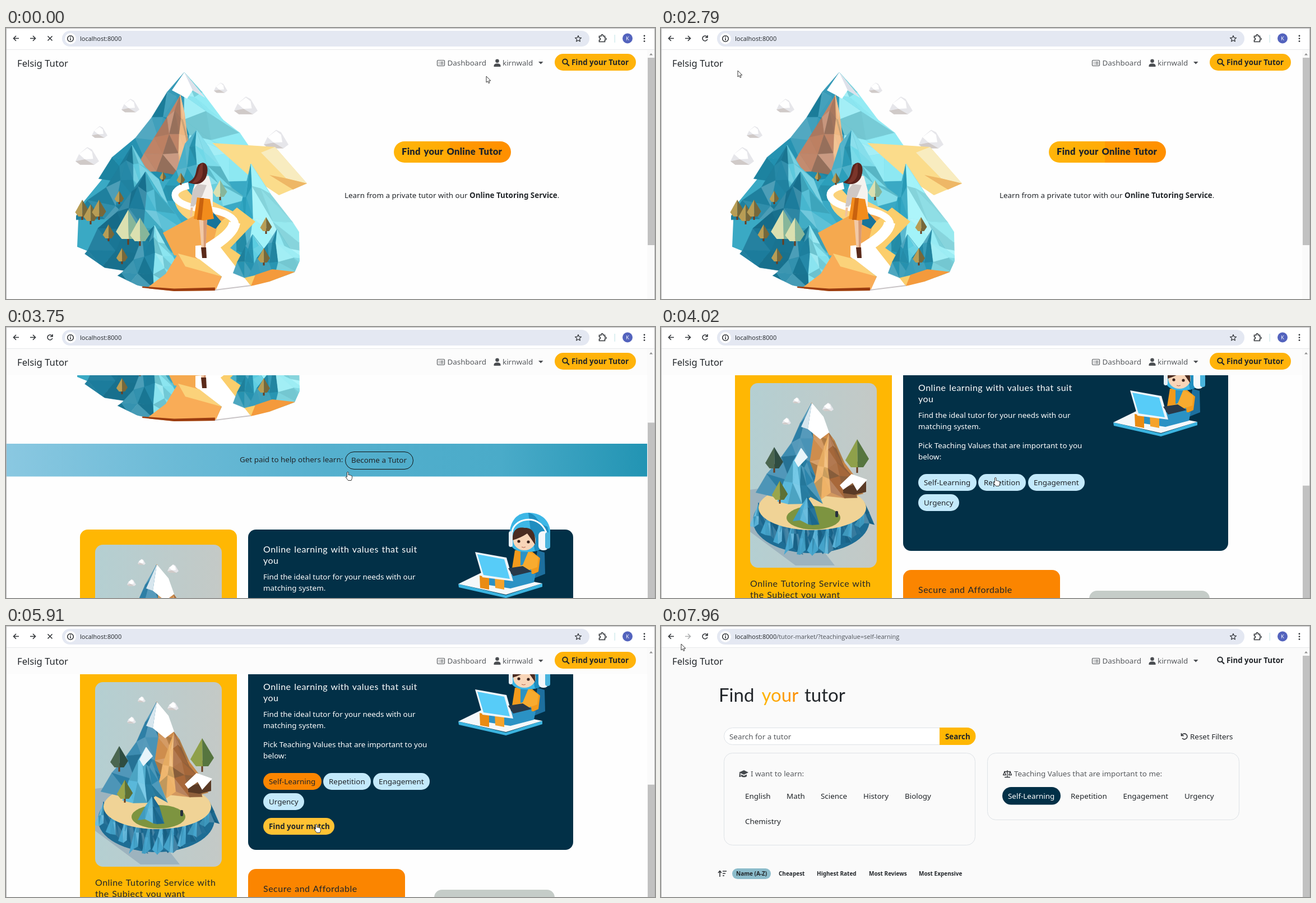
These frames come from a looping animation (1158 by 483 pixels, 8000 ms). An HTML page:

```html
<!DOCTYPE html>
<html lang="en">
<head>
<meta charset="utf-8">
<title>Tutoring site walkthrough</title>
<style>
html, body { margin: 0; width: 100%; height: 100%; overflow: hidden; background: #fff; }
svg { display: block; width: 100%; height: 100%; }
text { font: 13.42px "Noto Sans", sans-serif; fill: #212529; white-space: pre; }
.semi { font-size: 13.35px; font-weight: 600; }
.dim { fill: #56595d; }
.lit { fill: #fff; }
.brand { font-size: 16.67px; }
.small { font-size: 10px; font-weight: 700; }
.url { font: 11px "Open Sans", sans-serif; }
.head { font: 16px Lato, sans-serif; letter-spacing: .5px; word-spacing: 1px; }
.cta { font: 900 16.5px Lato, sans-serif; letter-spacing: .3px; word-spacing: 2px; }
.title { font: 33px Lato, sans-serif; word-spacing: 6px; }
.line { fill: none; stroke: #33363a; stroke-width: 1.6; }
</style>
</head>
<body>
<svg id="stage" viewBox="0 0 1158 483" preserveAspectRatio="none"></svg>
<script>
const text = (x, y, s, cls = '', more = '') => `<text x="${x}" y="${y}" class="${cls}" ${more}>${s}</text>`;
const box = (x, y, w, h, r, fill, more = '') =>
  `<rect x="${x}" y="${y}" width="${w}" height="${h}" rx="${r}" fill="${fill}" ${more}/>`;
const path = (d, more = 'class="line"') => `<path d="${d}" ${more}/>`;
const shape = (fill, d) => path(d + 'Z', `fill="${fill}"`);
const stroke = (c, w, d) => path(d, `fill="none" stroke="${c}" stroke-width="${w}" stroke-linejoin="round"`);
const disc = (x, y, r, fill, more = '') => `<circle cx="${x}" cy="${y}" r="${r}" fill="${fill}" ${more}/>`;
const oval = (x, y, rx, ry, fill) => `<ellipse cx="${x}" cy="${y}" rx="${rx}" ry="${ry}" fill="${fill}"/>`;
const group = (id, s, more = '') => `<g id="${id}" ${more}>${s}</g>`;
const range = n => [...Array(n).keys()];
const times = (n, f) => range(n).map(f).join('');

let seed = 7;
const rnd = () => (seed = seed * 16807 % 2147483647) / 2147483647;
const wobble = amount => (rnd() - .5) * amount;

function mix(a, b, u) {
  const part = (c, i) => parseInt(c.slice(1 + 2 * i, 3 + 2 * i), 16);
  return `rgb(${range(3).map(i => Math.round(part(a, i) + (part(b, i) - part(a, i)) * u))})`;
}

function facet(points, color) {
  const c = rnd() < .5 ? mix(color, '#ffffff', rnd() * .22) : mix(color, '#003040', rnd() * .22);
  return `<polygon points="${points.join(' ')}" fill="${c}" stroke="${c}" stroke-width=".6"/>`;
}

// low-poly mountain: a mesh fanning out from the summit, dark left and light right
function peak(x, y, left, right, foot, dark, light, rows = 4) {
  const feet = [left, (left + x) / 2, x, (x + right) / 2, right];
  const mesh = range(rows + 1).map(r => feet.map(f => [
    x + (f - x + wobble((right - left) * .12)) * r / rows,
    y + (foot - y) * r / rows + (r && wobble((foot - y) / rows * .5))]));
  return times(rows, r => times(4, c => {
    const [a, b, d, e] = [mesh[r][c], mesh[r][c + 1], mesh[r + 1][c], mesh[r + 1][c + 1]];
    const color = c < 2 ? dark : light;
    return facet([a, d, e], color) + facet([a, b, e], color);
  }));
}

const tree = (x, y, h, light = '#b89d55', dark = '#77683a') =>
  box(x - 1.5, y + h * .8, 3, h * .4, 0, '#6b3d1f') +
  shape(light, `M${x} ${y}l${-h * .42} ${h * .75}l${h * .2} ${h * .25}h${h * .24}`) +
  shape(dark, `M${x} ${y}l${h * .42} ${h * .7}l${-h * .2} ${h * .3}h${-h * .2}`);

const cloud = (x, y, w) => `<g transform="translate(${x} ${y}) scale(${w})">` +
  shape('#e6e6ea', 'M-.5 .2L-.35 -.1L0 -.4L.2 -.3L.5 .2L.3 .35H-.3') +
  shape('#fff', 'M-.35 -.1L0 -.36L.2 -.2L.25 .1L-.1 .12') +
  shape('#d0cac8', 'M-.5 .2L-.1 .12L.3 .35H-.3') + '</g>';

const walker =
  stroke('#f0c29c', 4, 'M332 316L330 336M365 318L368 332') +
  shape('#f2c9a6', 'M344 335H359L356 396H349') + shape('#d79a75', 'M352 335H359L356 396H353') +
  shape('#5a2a1a', 'M348 391H357L358 410H350') +
  shape('#f5f2ee', 'M342 262L362 264L369 290V318H362V306H342L336 320H329L333 290') +
  shape('#cfc8c5', 'M342 278L358 280L350 300L335 318H329L333 290') +
  shape('#f28c1c', 'M341 302L364 305L371 340L352 343L335 340') +
  shape('#c9620e', 'M346 303H353L349 342H341') +
  shape('#5a231c', 'M351 240C360 241 361 252 358 263C354 277 340 282 325 275C337 269 338 262 340 252Q342 241 351 240') +
  shape('#7b352a', 'M351 241C341 246 347 262 332 276C341 278 350 270 351 258');

const road = 'M326 281C288 288 294 314 345 322C400 326 428 346 396 371Q375 386 360 400';
const scenery =
  shape('#3aa9c4', 'M318 90L200 235L130 320L127 390L300 460L470 440L515 370L430 230') +
  peak(318, 79, 165, 490, 270, '#2290b0', '#8feaf4', 5) +
  shape('#fff', 'M318 79L296 111L311 119L323 126L333 111L355 124') + shape('#dde1ea', 'M318 79L333 111L355 124') +
  peak(311, 120, 222, 338, 262, '#bd8062', '#f0b881') +
  shape('#fbdc8b', 'M368 205L480 212L537 277L487 298L430 260') + shape('#f8ecc0', 'M455 222L480 212L537 277L500 268') +
  shape('#eeb766', 'M500 268L537 277L512 288L470 262') +
  peak(340, 182, 262, 425, 310, '#2ea3c0', '#70d8e7') +
  peak(225, 209, 128, 310, 345, '#2186a5', '#5cc8dd') +
  stroke('#fbd27a', 50, 'M330 296C314 310 345 326 385 345Q420 360 390 390') +
  peak(437, 242, 375, 590, 450, '#2ca4c1', '#a0f3f9') +
  peak(249, 256, 120, 375, 430, '#1c7c9c', '#48b9d2', 5) +
  shape('#f5a94f', 'M280 365L335 335L385 322L405 350L345 412L300 405') +
  shape('#fbce6c', 'M378 350L412 320L445 345L400 392L470 440L437 460L360 420') +
  stroke('#fff', 12, road) + stroke('#fff', 20, 'M408 347Q405 368 358 395') +
  shape('#fff', 'M338 388L378 385L437 460L373 468L385 443L338 408') +
  shape('#17749a', 'M362 320L384 345L374 358L358 350') +
  peak(440, 368, 400, 500, 440, '#2794b2', '#5ccde1', 3) + peak(484, 358, 435, 560, 445, '#2794b2', '#8feaf3', 3) +
  shape('#f49a3c', 'M437 460L445 440L475 430L520 435L470 455') +
  peak(265, 352, 185, 330, 462, '#1f86a6', '#84e3ef') +
  shape('#f9ac57', 'M307 402L385 443L373 470H243L285 438') + shape('#fbd27a', 'M307 402L345 412L385 443L320 425') +
  stroke('#9a3c10', 7, 'M243 464L300 468L373 466') + stroke('#c9c4c6', 4, 'M373 468L437 460');

const hero =
  [[222, 139, 32], [383, 107, 24], [428, 139, 42], [167, 186, 28], [145, 229, 42], [482, 199, 44]].map(c => cloud(...c)).join('') +
  `<g clip-path="url(#shore)">${scenery}</g>` +
  tree(280, 256, 14) + tree(312, 258, 18) + tree(202, 290, 20) + times(3, i => tree(136 + i * 15, 306 + i % 2 * 8, 30)) +
  tree(183, 350, 25) + tree(207, 392, 24) + tree(464, 337, 25) + tree(460, 392, 26) +
  [[218, 324, 52], [239, 338, 42], [382, 271, 30]].map(a => tree(...a, '#dbe0b0', '#87b69a')).join('') + walker;

const rocks = times(10, i => {
  const bulge = Math.sin((i + .5) / 10 * Math.PI), x = 174 + i * 21;
  return peak(x, 308 + 36 * bulge, x - 17, x + 17, 345 + 60 * bulge, '#48a9d2', '#1d6a92', 2);
});
const island =
  shape('#9db3be', 'M159 290L200 285L310 425H240L159 365') +
  oval(268, 345, 104, 58, '#1e6d94') + rocks + oval(270, 322, 96, 40, '#f0d396') +
  peak(269, 135, 172, 368, 300, '#2f83ab', '#cc8744', 5) +
  peak(300, 190, 262, 352, 300, '#eeb063', '#a8683a') +
  shape('#fff', 'M269 135L262 182L284 200L300 188L290 160') + shape('#d7e6ee', 'M269 135L262 182L250 178') +
  peak(250, 215, 208, 285, 310, '#5fc0e3', '#2c86ad', 3) + shape('#e8f5fa', 'M250 215L262 232L245 250L238 238') +
  oval(272, 340, 48, 21, '#7d9440') + peak(261, 303, 234, 284, 348, '#4db0d8', '#1d6f98', 2) +
  shape('#5a3a25', 'M325 286L350 280L366 275V294L345 299L325 296') +
  shape('#fff', 'M319 282L340 262L368 272L350 292L342 278L325 290') +
  tree(212, 274, 34, '#9aa54a', '#5d7034') + tree(350, 200, 50, '#8fa04a', '#56753f') + tree(202, 214, 38, '#4b6650', '#2f4c41') +
  box(311, 328, 5, 11, 2, '#26303c') + cloud(242, 131, 14) + cloud(298, 143, 20) + cloud(224, 168, 16);

const learner =
  shape('#3bb4e0', 'M807 458L892 478L957 457V463L892 483L808 464') + shape('#f4f8fa', 'M807 458L850 437L957 457L892 477') +
  shape('#1d6f9e', 'M948 398L961 402L962 440L942 448') + shape('#f39a1c', 'M908 398H936L953 412L950 436L925 448L902 436') +
  shape('#2b92c4', 'M918 398H932L938 440H918') + shape('#f8ab2f', 'M932 400L950 410L948 428L925 436L903 430L922 424') +
  shape('#2b92c4', 'M862 446L885 440H945L942 455L900 466L862 460') +
  times(2, i => shape(i ? '#f5a32a' : '#e98b13', `M${845 + i * 27} 443l17 3v22l-16 -3`)) +
  shape('#eef5f9', 'M837 401L893 411L905 453L850 446') + shape('#57ccf8', 'M841 405L889 414L899 449L852 442') +
  shape('#28394a', 'M896 430L922 426L938 436L905 444') +
  shape('#3db7e6', 'M932 331C908 331 898 350 898 375C898 396 912 401 930 401C956 401 972 390 971 362C968 342 953 331 932 331') +
  shape('#1f8ec0', 'M932 331C950 335 946 350 966 356C974 380 960 396 944 400L936 362') +
  oval(925, 380, 20, 18, '#f8d5b8') +
  shape('#4a2c22', 'M904 380C903 360 914 356 925 358C938 357 946 366 944 388Q936 376 930 368Q918 376 904 380') +
  disc(915, 382, 2.6, '#3a221c') + disc(932, 383, 2.6, '#3a221c') + stroke('#b5604a', 1, 'M920 392q4 2 7 0') +
  stroke('#fff', 3, 'M903 366C904 342 950 330 964 366') +
  box(897, 364, 7, 28, 3.5, '#e6eff5') + box(950, 364, 18, 34, 8, '#f4f8fb') + box(962, 366, 9, 29, 4, '#4ab4dd');

const pill = (id, x, y, w, s, fill = '#c3e9fb', cls = '') =>
  group(id, box(x, y, w, 30, 15, fill) + text(x + 10, y + 19.5, s, cls));
const lines = (x, y, cls, list) => list.map((s, i) => text(x, y + i * 20, s, cls)).join('');

const home = hero +
  box(692, 202, 209, 38, 19, 'url(#warm)') + text(706, 226, 'Find your Online Tutor', 'cta') +
  text(604, 302.5, 'Learn from a private tutor with our <tspan font-weight="700">Online Tutoring Service</tspan>.') +
  box(0, 509, 1144, 58.500, 0, 'url(#band)') + text(417, 542, 'Get paid to help others learn:') +
  box(605.5, 523.5, 121, 31, 15.5, 'none', 'stroke="#111"') + text(616, 543, 'Become a Tutor') +
  box(132, 662, 280, 500, 14, '#ffb703') +
  `<g transform="translate(0 589)" clip-path="url(#photo)">${box(159, 100, 226, 329, 0, 'url(#sky)') + island}</g>` +
  lines(159, 1052, 'head', ['Online Tutoring Service with', 'the Subject you want']) +
  box(432, 662, 580, 326, 14, '#023047') +
  lines(459, 703, 'head lit', ['Online learning with values that suit', 'you']) +
  lines(459, 750.5, 'lit', ['Find the ideal tutor for your needs with our', 'matching system.']) +
  lines(459, 804.5, 'lit', ['Pick Teaching Values that are important to you', 'below:']) +
  pill('self', 459, 851, 104, 'Self-Learning') + pill('repeat', 566, 851, 85, 'Repetition') +
  pill('engage', 655, 851, 101, 'Engagement') + pill('urgent', 459, 887, 73, 'Urgency') +
  pill('match', 459, 931, 127, 'Find your match', '#ffb703', 'semi') +
  `<g transform="translate(0 301)">${learner}</g>` +
  box(432, 1022, 280, 200, 14, '#fb8500') + lines(459, 1063, 'head', ['Secure and Affordable', 'Payments']) +
  box(764, 1059, 215, 200, 14, '#c5ccc8');

const row = (y, cls, items) => Object.entries(items).map(([s, x]) => text(x, y, s, cls)).join('');
const frame = (x, y, w, h, fill = 'none') => box(x, y, w, h, 15, fill, 'stroke="#dee2e6"');

const market = box(0, 39, 1158, 444, 0, '#fafafa') +
  row(135, 'title', { Find: 103, tutor: 256 }) + text(179.5, 135, 'your', 'title', 'style="fill:url(#word)"') +
  frame(112.5, 181.5, 448, 30, '#fff') + shape('#ffb703', 'M497 181H546A15.5 15.5 0 0 1 546 212H497') +
  text(122, 201.5, 'Search for a tutor', 'dim') + text(507, 201.5, 'Search', 'semi') +
  path('M928.5 191v4.5h4.5M929.5 194.5A5 5 0 1 1 930 200') + text(944, 201.5, 'Reset Filters') +
  frame(112.5, 226.5, 448, 164) + frame(582.5, 226.5, 449, 119) +
  shape('#44484c', 'M139 261L148 257L156 261L148 265ZM143 264.5L148 267L153 264.5V268Q148 271 143 268ZM140 262h1.5l1 7h-3') +
  text(160, 268, 'I want to learn:', 'dim') +
  stroke('#33363a', 1.3, 'M618 257V269M613 269.5H623M612 259.5H624M610.5 265.5l2.5 -5.5l2.500 5.500zM620.500 265.500l2.500 -5.500l2.500 5.500z') +
  text(630, 268, 'Teaching Values that are important to me:', 'dim') +
  row(307.5, '', { English: 150, Math: 224, Science: 285, History: 361, Biology: 435 }) + text(150, 352.5, 'Chemistry') +
  group('plain', text(620, 307.5, 'Self-Learning')) +
  group('picked', box(609, 287, 104, 31.5, 15.7, '#023047') + text(619, 307.5, 'Self-Learning', 'lit')) +
  group('values', row(307.5, '', { Repetition: 732, Engagement: 825.5, Urgency: 935 })) +
  path('M105 447V437M102 440l3 -3.5l3 3.5M110 437h7M110 441h5M110 445h3') +
  box(127, 432, 69, 19, 9.5, '#8cbccb') +
  row(444.5, 'small', { 'Name (A-Z)': 134, Cheapest: 210, 'Highest Rated': 278, 'Most Reviews': 371, 'Most Expensive': 460 });

const nav = group('veil', box(0, 39, 1144, 47, 0, '#fcfcfc')) +
  group('button', box(979, 46, 145, 30, 15, '#ffb30a')) + text(20, 68.5, 'Felsig Tutor', 'brand') +
  box(769.5, 57.5, 13, 10, 1.5, 'none', 'stroke="#56595d" stroke-width="1.2"') +
  times(3, i => stroke('#56595d', 1, `M772 ${60.5 + i * 2.2}h1.5m1.5 0h5.5`)) +
  text(787.5, 67, 'Dashboard', 'dim') +
  disc(876.5, 58.8, 3.3, '#4b4e52') + shape('#4b4e52', 'M870.5 69V67Q871 63.3 876.5 63.3Q882 63.3 882.5 67V69') +
  text(886, 67, 'kirnwald', 'dim') + shape('#4b4e52', 'M950 60h8.5l-4.25 4.6') +
  disc(997.5, 59.8, 4.3, 'none', 'stroke="#212529" stroke-width="1.9"') + stroke('#212529', 2.2, 'M1000.5 63l4.5 4.5') +
  text(1009, 66, 'Find your Tutor', 'semi');

const star = range(10).map(i => {
  const a = i * Math.PI / 5, r = i % 2 ? 2.6 : 5.8;
  return `${1021 + r * Math.sin(a)} ${19.3 - r * Math.cos(a)}`;
}).join('L');

const chrome = box(0, 0, 1158, 39, 0, '#fff') + box(0, 38, 1158, 1, 0, '#e7e8ea') +
  path('M23 18.5H14M18 14L13.5 18.5L18 23') + group('forward', path('M43 18.5H52M48 14L52.5 18.5L48 23')) +
  group('stop', path('M74.5 14.5l8 8m0 -8l-8 8')) +
  group('reload', path('M82.3 16A4.5 4.5 0 1 0 82.8 20M83 13V17H79')) +
  box(100, 5, 941, 28, 14, '#e4e8f2') + disc(115, 19, 10, '#fff') + disc(115, 19, 5.3, 'none', 'class="line"') +
  path('M115 18V22M115 15.5V17') + text(132, 23, 'localhost:8000<tspan id="route" fill="#50545a"></tspan>', 'url') +
  stroke('#33363a', 1.2, `M${star}Z`) +
  path('M1058.5 14.5h3.5v-1a1.7 1.7 0 0 1 3.4 0v1h3.1v3.5h1a1.5 1.5 0 0 1 0 3h-1v3.5h-10v-3a2 2 0 0 0 0 -4z') +
  box(1085.5, 12, 1.5, 14, 0, '#d3ebee') +
  disc(1109, 18.5, 9, '#5363bd') + text(1109, 22, 'K', 'url lit', 'text-anchor="middle" style="font-size:9.5px"') +
  times(3, i => disc(1139, 14 + i * 4.8, 1.4, '#33363a'));

const fade = (id, ...stops) => `<linearGradient id="${id}">` +
  stops.map(s => s.split(' ')).map(([c, o]) => `<stop offset="${o}" stop-color="${c}"/>`).join('') + '</linearGradient>';
const pointerShape = (id, d) => group(id, path(d + 'Z', 'fill="#fff" stroke="#222" stroke-width=".9"'));

document.getElementById('stage').innerHTML = '<defs>' +
  fade('warm', '#ffb50a 0', '#ffab05 .48', '#ff9b02 .48', '#ff8f00 1') +
  fade('band', '#8ac8e1 0', '#6dbbd7 .25', '#55b0ce .5', '#4aabc9 .77', '#2294b3 1') +
  fade('word', '#ffb703 0', '#fb8c00 1') + fade('sky', '#b4cfd2 0', '#c4c9c6 1') +
  `<clipPath id="photo">${box(159, 100, 226, 329, 14, '#000')}</clipPath>` +
  `<clipPath id="shore">${shape('#000', 'M125 70H540V290L523 365L524 415L515 435L470 452L437 460L373 468L300 469L243 463L190 437L125 392')}</clipPath></defs>` +
  box(0, 0, 1158, 483, 0, '#fefefe') + nav.slice(0, 0) + group('home', home) + group('market', market) + nav +
  box(1144, 39, 14, 444, 0, '#fafafa') + shape('#8d8d8d', 'M1148 48.5h6l-3 -3.5') +
  '<rect id="thumb" x="1145" width="12" fill="#c1c1c1"/>' + chrome + stroke('#b4b4b4', 1, 'M0 .5H1158M.5 0V483M1157.5 0V483') +
  pointerShape('arrow', 'M0 0V11L2.5 8.8L4.2 12.5L6 11.7L4.4 8H7.8') +
  pointerShape('hand', 'M1.5 1Q3 -.5 4 1V6Q5.5 5 6.5 6.3Q8 5.6 8.7 7Q10.3 6.6 10.5 8.3V11.5L9 15.5H3.5L-.7 10Q-1 8.3 1.5 9');

const el = {};
document.querySelectorAll('#stage [id]').forEach(n => el[n.id] = n);
const show = (id, on) => el[id].setAttribute('display', on ? 'inline' : 'none');
const move = (id, x, y) => el[id].setAttribute('transform', `translate(${Math.round(x)} ${Math.round(y)})`);
const tint = (id, c) => el[id].firstChild.setAttribute('fill', c);

const LOOP = 8000, STEP = LOOP / 60;
const between = (t, a, b) => t >= a && t < b;

// each leg: start, end, destination
const pointerLegs = [[0, 250, 874, 58], [250, 1050, 702, 223], [1100, 1860, 159, 66], [1860, 2130, 14, 14],
  [2500, 3330, 429, 222], [3330, 3730, 607, 258], [3730, 4000, 594, 268], [4260, 4410, 540, 271],
  [5000, 5450, 551, 353], [6180, 6840, 605, 328], [7100, 7960, 36, 32]];
const scrollLegs = [[3080, 3330, 131], [3460, 3730, 301], [3730, 4000, 589]];

const travel = (legs, from, t) => legs.reduce((p, [a, b, ...to]) => {
  const u = Math.min(1, Math.max(0, (t - a) / (b - a))), e = u * u * (3 - 2 * u);
  return p.map((v, i) => v + (to[i] - v) * e);
}, from);

function draw(now) {
  // the screen refreshes in even steps
  const t = Math.floor(now % LOOP / STEP + .3) * STEP;
  const matched = t >= 6150, onMarket = between(t, 1190, 2250) || matched;
  const loading = t < 1190 || between(t, 5590, 6930);
  const hand = between(t, 600, 1150) || between(t, 3700, 6150);
  const [y] = travel(scrollLegs, [0], t), [px, py] = travel(pointerLegs, [857, 86], t);
  show('home', !onMarket);
  show('market', onMarket);
  show('button', !onMarket);
  show('veil', !onMarket && y > 0);
  show('plain', !matched);
  show('picked', matched);
  show('stop', loading);
  show('reload', !loading);
  show('match', t >= 4660);
  show('hand', hand);
  show('arrow', !hand);
  move('home', 0, -y);
  move('values', matched ? -1 : 0, 0);
  move(hand ? 'hand' : 'arrow', px, py);
  tint('self', t >= 4390 ? '#fb8500' : '#c3e9fb');
  tint('repeat', between(t, 4100, 4390) ? '#fb8500' : '#c3e9fb');
  tint('match', t > 5350 ? '#ffc233' : '#ffb703');
  el.forward.setAttribute('opacity', onMarket ? .4 : 1);
  el.route.textContent = onMarket ? '/tutor-market/' + (matched ? '?teachingvalue=self-learning' : '') : '';
  el.thumb.setAttribute('y', 53 + (onMarket ? 0 : y * .39));
  el.thumb.setAttribute('height', onMarket ? 430 : 334);
}

const begin = performance.now();
(function tick() {
  draw(performance.now() - begin);
  requestAnimationFrame(tick);
})();
</script>
</body>
</html>
```
